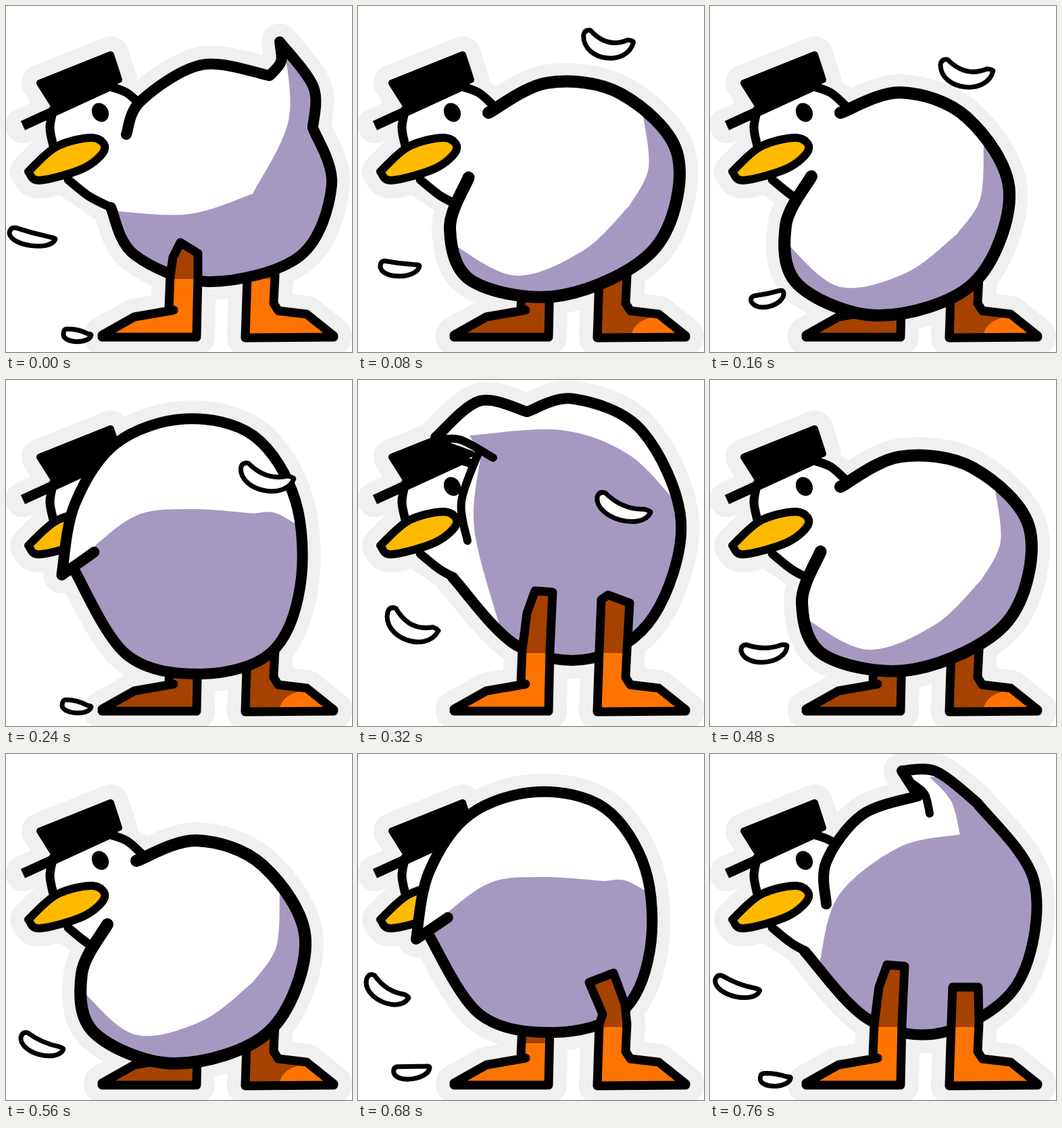
An HTML page with a canvas that plays this animation: 512 px wide and 512 px high, repeating every 800 ms.

```html
<!DOCTYPE html>
<html lang="en">
<head>
<meta charset="utf-8">
<title>Wiggling duck</title>
<style>
html, body { margin: 0; width: 100%; height: 100%; overflow: hidden; background: #fff; }
canvas { display: block; width: 512px; height: 512px; }
</style>
</head>
<body>
<canvas id="stage" width="512" height="512"></canvas>
<script>
const ctx = document.getElementById('stage').getContext('2d');
const STEP = 40, STEPS = 20;
const INK = 'black', WHITE = 'white', PURPLE = '#a599c2', ORANGE = '#ff7300',
      BROWN = '#a64200', YELLOW = '#ffba00', HALO = '#f0f0f0';

// Smooth curve through "x,y" points; a slash makes the last point a corner.
function curve(text) {
  const path = new Path2D();
  let last = null;
  for (const part of text.split('/')) {
    const pts = part.trim().split(/\s+/).map(p => p.split(',').map(Number));
    if (last) pts.unshift(last);
    else path.moveTo(...pts[0]);
    for (let i = 0; i < pts.length - 1; i++) {
      const p = pts[i], q = pts[i + 1], o = pts[i - 1] || p, r = pts[i + 2] || q;
      path.bezierCurveTo(p[0] + (q[0] - o[0]) / 6, p[1] + (q[1] - o[1]) / 6,
                         q[0] - (r[0] - p[0]) / 6, q[1] - (r[1] - p[1]) / 6, q[0], q[1]);
    }
    last = pts[pts.length - 1];
  }
  return path;
}

const polygon = text => curve(text.replace(/ /g, ' / '));

function oval(x, y, rx, ry, turn = 0) {
  const path = new Path2D();
  path.ellipse(x, y, rx, ry, turn, 0, 7);
  return path;
}

const head = {
  face: polygon('68,205 70,155 150,118 200,147 155,298 95,258'),
  lines: ['70,207 65,180 70,153', '150,118 178,128 200,147', '92,257 122,281 155,298'].map(curve),
  beak: curve('33,245 75,208 128,195 146,212 115,240 50,258 33,245'),
  hat: polygon('50,114 155,72 167,109 74,152 50,114'),
  brim: curve('25,177 160,115'),
  eye: oval(139.5, 157.5, 12, 14.5, -0.5)
};
const toe = oval(445, 488, 40, 28);

// The shaded side runs along the given edge and fills everything right of and below it.
function shadeFrom(edge) {
  const y = edge.split(/[ ,]/)[1], x = edge.split(' ').pop().split(',')[0];
  return curve(`${edge} / ${x},700 / 700,700 / 700,${y}`);
}

function makeLegs({ left, right, low, drop = 404 }) {
  const leg = (heel, top, sole) => polygon(`${heel} ${top} ${sole}`);
  return [
    { front: !!left, dark: left ? 404 : drop,
      path: leg('142,487 190,460 248,450 241,448 243,400', left || '243,390', '284,400 282,490 142,490') },
    { front: !!right, dark: right ? 404 : drop,
      path: leg('485,488 445,456 403,451 396,440 398,400', right || '398,390', '357,400 354,491 485,490') }
  ].map(l => low ? { ...l, dark: 512, toe: true } : l);
}

const makePose = (line, edge, legs, close = '', extra = []) => ({
  line: curve(line), fill: curve(line + close), shade: shadeFrom(edge),
  extra: extra.map(curve), width: legs.low ? 18 : 16, legs: makeLegs(legs)
});

function turned(pose, x, y, angle, sx, sy, legs = pose.legs) {
  const m = new DOMMatrix().translate(x, y).rotate(angle).scale(sx, sy).translate(-x, -y);
  const move = path => {
    const copy = new Path2D();
    copy.addPath(path, m);
    return copy;
  };
  return { ...pose, legs, line: move(pose.line), fill: move(pose.fill), shade: move(pose.shade) };
}

const belly = '345,412 235,393 140,292';
const tall = '250,345 262,312 288,314';

const tailUp = makePose(
  '178,190 200,140 290,87 390,103 / 407,82 405,53 / 455,120 454,180 / 482,265 435,370 300,408 190,368 155,298',
  '412,60 418,170 365,278 / 270,308 155,303',
  { left: '247,372 258,350 284,366' });

const squat = makePose(
  '193,158 282,128 380,165 443,275 390,410 250,458 130,412 112,325 150,252',
  '405,200 400,285 365,338 / 290,395 190,415 108,345',
  { low: true });

const bow = makePose(
  '133,242 / 86,274 / 105,175 165,90 265,56 365,80 425,170 432,290 390,382 290,412 180,385 103,265',
  '430,205 395,187 365,188 / 270,182 190,193 105,258',
  { right: '395,370 378,324 342,338 362,385', drop: 428 });

const front = '162,238 153,180 178,108';
const droop = makePose(
  '115,85 180,31 250,47 / 320,28 420,75 478,210 437,350 ' + belly,
  '470,180 400,110 300,74 165,82 / 182,110 / 172,220 210,365',
  { left: tall, right: '402,330 370,318 360,325' },
  ` / ${front} / 115,85`, ['112,90 150,88 200,115', front]);

const tailBack = makePose(
  '172,222 172,160 225,90 308,62 / 284,25 / 335,26 395,72 / 480,190 455,340 ' + belly,
  '325,34 357,70 370,119 / 280,138 190,210 162,310',
  { left: tall, right: '397,345 359,345' },
  '', ['300,44 318,60 325,88']);

const POSES = [
  tailUp,
  turned(tailUp, 290, 260, 25, 1.04, 1, makeLegs({ drop: 428 })),
  turned(squat, 193, 158, -10, 1.06, 0.95),
  turned(squat, 193, 158, -5, 1.03, 0.98),
  squat,
  turned(squat, 193, 158, 3, 0.98, 0.98),
  turned(bow, 265, 30, 0, 1.02, 1.06, squat.legs),
  bow,
  droop,
  tailBack
];

// Rows: step, left end, right end, sag.
const FEATHERS = [
  [[17, 13, 332, 75, 361, 6],
   [20, 5, 336, 73, 345, -4],
   [24, 61, 437, 109, 424, -4],
   [26, 83, 482, 126, 484, -10]],
  [[8, 44, 343, 119, 371, 16],
   [10, 70, 383, 143, 350, 8],
   [14, 22, 419, 85, 437, 0],
   [17, 53, 472, 106, 464, -6],
   [20, 85, 487, 126, 487, -10]],
  [[1, 330, 22, 402, 32, 15],
   [4, 341, 87, 419, 96, 15],
   [8, 354, 173, 433, 196, 8],
   [11, 376, 246, 422, 263, 0]]
];

function ink(path, width, color = INK) {
  ctx.lineWidth = width;
  ctx.strokeStyle = color;
  ctx.stroke(path);
}

function paint(path, color) {
  ctx.fillStyle = color;
  ctx.fill(path);
}

function inside(path, draw) {
  ctx.save();
  ctx.clip(path);
  draw();
  ctx.restore();
}

function drawHalo(pose) {
  for (const path of [pose.fill, head.face, head.beak, head.hat, ...pose.legs.map(l => l.path)]) {
    paint(path, HALO);
    ink(path, 54, HALO);
  }
  ink(head.brim, 52, HALO);
}

function drawHead() {
  paint(head.face, WHITE);
  head.lines.forEach(l => ink(l, 13));
  paint(head.hat, INK);
  ink(head.hat, 10);
  ctx.lineCap = 'butt';
  ink(head.brim, 15);
  ctx.lineCap = 'round';
  paint(head.eye, INK);
  paint(head.beak, YELLOW);
  ink(head.beak, 12);
}

function drawLeg(leg) {
  paint(leg.path, ORANGE);
  inside(leg.path, () => {
    ctx.fillStyle = BROWN;
    ctx.fillRect(0, 0, 512, leg.dark);
    if (leg.toe) paint(toe, ORANGE);
  });
  ink(leg.path, 13);
}

function drawBody(pose) {
  paint(pose.fill, WHITE);
  inside(pose.fill, () => paint(pose.shade, PURPLE));
  ink(pose.line, pose.width);
  pose.extra.forEach(l => ink(l, 12));
}

function drawFeather(keys, step) {
  if (step < keys[0][0]) step += STEPS;
  const i = keys.findIndex(k => k[0] >= step);
  if (i < 0) return;
  const to = keys[i], from = keys[Math.max(0, i - 1)];
  const f = to === from ? 0 : (step - from[0]) / (to[0] - from[0]);
  const [, x1, y1, x2, y2, sag] = from.map((v, n) => v + (to[n] - v) * f);
  const len = Math.hypot(x2 - x1, y2 - y1), near = len * 0.12;
  const b = Math.max(2, (y1 - y2) / 3), a = Math.max(0, 11 - b), low = sag + 23;
  const path = new Path2D();
  path.moveTo(near, -a);
  path.quadraticCurveTo(0, -a, 0, 0);
  path.bezierCurveTo(near / 2, low, len - near / 2, low, len, 0);
  path.quadraticCurveTo(len, -b, len - near, -b);
  path.quadraticCurveTo(len / 2, sag, near, -a);
  path.closePath();
  ctx.save();
  ctx.translate(x1, y1);
  ctx.rotate(Math.atan2(y2 - y1, x2 - x1));
  paint(path, WHITE);
  ink(path, 7);
  ctx.restore();
}

function draw(step) {
  const pose = POSES[step % POSES.length];
  ctx.fillStyle = WHITE;
  ctx.fillRect(0, 0, 512, 512);
  drawHalo(pose);
  drawHead();
  pose.legs.filter(l => !l.front).forEach(drawLeg);
  drawBody(pose);
  pose.legs.filter(l => l.front).forEach(drawLeg);
  FEATHERS.forEach(keys => drawFeather(keys, step));
}

ctx.lineJoin = ctx.lineCap = 'round';
const start = performance.now();
let shown = -1;
function tick() {
  const step = Math.floor((performance.now() - start) / STEP) % STEPS;
  if (step !== shown) draw(shown = step);
  requestAnimationFrame(tick);
}
tick();
</script>
</body>
</html>
```
